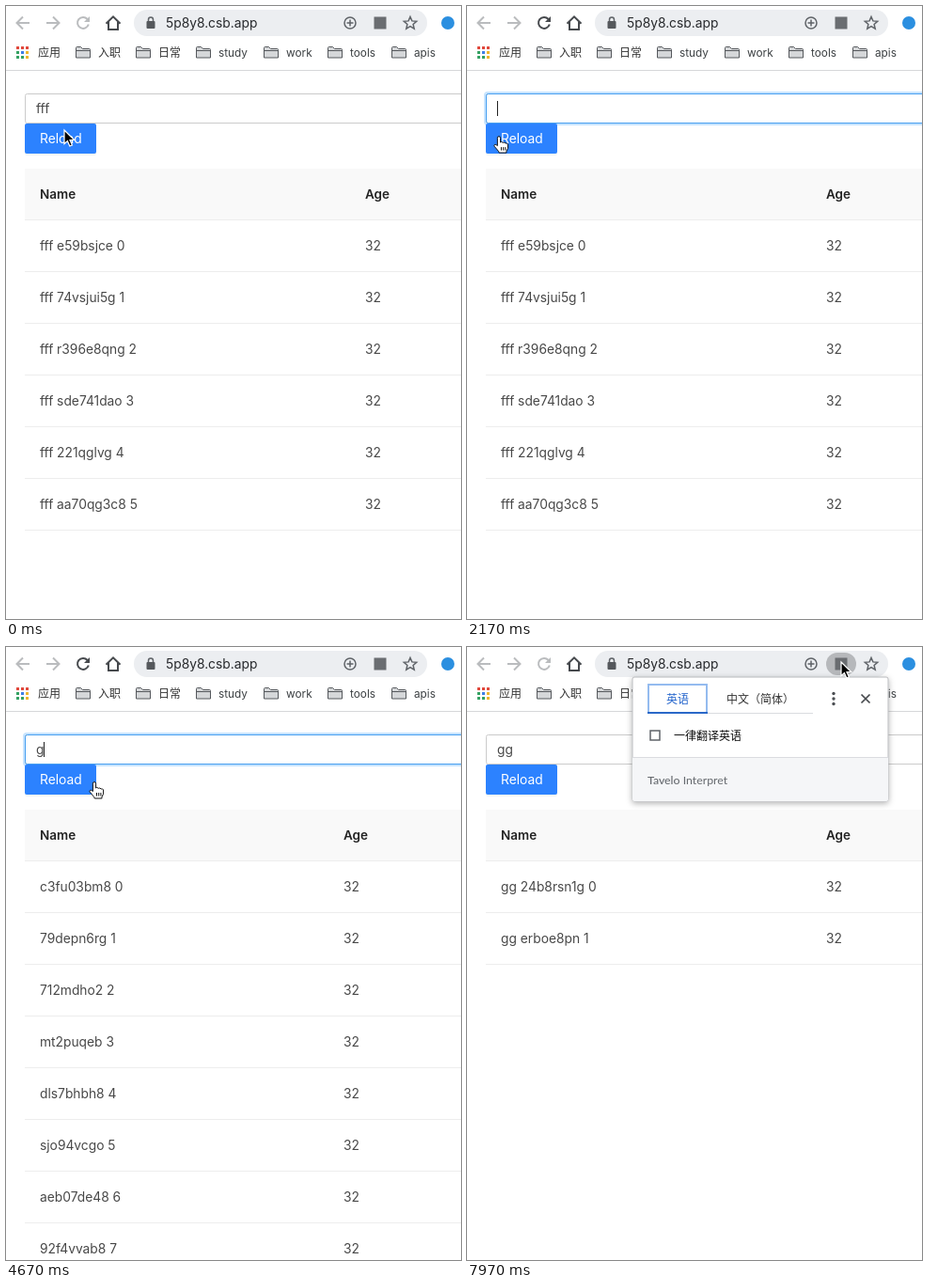
Recreate the animation shown at these times as an HTML page. Size 484 by 652 pixels, loop 8 s.

```html
<!DOCTYPE html>
<html lang="en">
<head>
<meta charset="utf-8">
<title>Table search demo</title>
<style>
  html, body { margin: 0; width: 100%; height: 100%; overflow: hidden; background: #fff; }
  svg { display: block; width: 484px; height: 652px; }
  text { font: 13.8px Inter, "Noto Sans CJK SC", "Noto Sans CJK", sans-serif; fill: #484848; white-space: pre; }
  .head { font-weight: 600; font-size: 13.5px; fill: #222; }
  .mark { font-size: 11.8px; fill: #3c4043; }
  .cjk { font: 12px "Noto Sans CJK SC", "Noto Sans CJK", sans-serif; fill: #333; }
  .line { fill: none; stroke: #46494d; stroke-width: 2; }
  .thin { fill: none; stroke: #5f6368; stroke-width: 1.5; }
</style>
</head>
<body>
<svg viewBox="0 0 484 652">
  <defs><filter id="shade" x="-10%" y="-10%" width="120%" height="130%">
    <feDropShadow dx="0" dy="2" stdDeviation="3" flood-opacity=".3"/>
  </filter></defs>

  <g id="toolbar">
    <path class="line" style="stroke:#babcbe" d="M25 18H12M18 11.5L11.5 18 18 24.5M43 18H56M50 11.5L56.5 18 50 24.5"/>
    <g id="refresh">
      <path d="M86.6 14A6 6 0 1 0 87.8 19.5" fill="none" stroke="currentColor" stroke-width="2"/>
      <path d="M89 11v6h-6z" fill="currentColor"/>
    </g>
    <path class="line" d="M106.5 18.8L114 11.3l7.5 7.5M109 17v8h10v-8"/>
    <rect x="136" y="4" width="312" height="28" rx="14" fill="#eceef1"/>
    <rect x="149.5" y="16" width="9" height="8" rx="1" fill="#55585c"/>
    <path class="thin" d="M151.5 16v-1.5a2.5 2.5 0 0 1 5 0V16"/>
    <text x="170" y="23" style="fill:#27292c">5p8y8.csb.app</text>
    <circle class="thin" cx="366" cy="18" r="6"/>
    <path class="thin" d="M362.5 18h7M366 14.5v7"/>
    <rect id="iconHover" x="382" y="6" width="32" height="24" rx="12"/>
    <rect x="391.5" y="11.5" width="13" height="13" fill="#6a6d71"/>
    <path class="thin" d="M430 11.5l1.9 4.4 4.8.4-3.6 3.2 1.1 4.7-4.2-2.5-4.2 2.5 1.1-4.7-3.6-3.2 4.8-.4z"/>
    <circle cx="470" cy="18" r="7" fill="#2b8fe0"/>
    <path d="M0 68.5H484" stroke="#d6d7d9"/>
  </g>
  <g id="bookmarks"></g>

  <rect x="20.5" y="93.5" width="480" height="31" rx="2" fill="#fff" stroke="#cbcbcb"/>
  <g id="focus" fill="none">
    <rect x="19" y="92" width="483" height="34" rx="3" stroke="#1890ff" stroke-opacity=".25" stroke-width="2"/>
    <rect x="20.5" y="93.5" width="480" height="31" rx="2" stroke="#469ff0"/>
  </g>
  <rect id="selection" y="100" height="17" fill="#4089ee"/>
  <text id="value" x="32" y="114"></text>
  <path id="spell" d="M32 116.5H47" stroke="#c44650" stroke-width="2" stroke-dasharray="2.5 1.5"/>
  <path id="caret" d="M0 101V117" stroke="#222"/>

  <rect id="wave" fill="#1890ff"/>
  <rect id="buttonShade" x="20" y="127" height="32" rx="2" fill-opacity=".045"/>
  <rect id="button" x="20" y="125" height="32" rx="2"/>
  <path id="spinner" d="M43 135.2A5.8 5.8 0 0 1 48.8 141" fill="none" stroke="#fff" stroke-width="1.2" stroke-linecap="round"/>
  <text id="label" y="146" style="fill:#fff">Reload</text>

  <g id="tables"></g>

  <g id="popup">
    <rect x="176" y="32" width="272" height="132" rx="2" fill="#fff" stroke="#b8babd" filter="url(#shade)"/>
    <path d="M176 117H448V162a2 2 0 0 1-2 2H178a2 2 0 0 1-2-2z" fill="#f5f6f8"/>
    <path d="M176 117.5H448M256 70.5H368" stroke="#dadce0"/>
    <rect x="193" y="40" width="62" height="30" fill="none" stroke="#94bbef" stroke-width="2"/>
    <path d="M192 70H256" stroke="#2a68c8" stroke-width="2"/>
    <text class="cjk" x="212" y="59.5" style="fill:#2465cc;font-weight:500">英语</text>
    <text class="cjk" x="276" y="59.5">中文（简体）</text>
    <g fill="#4b4e52"><circle cx="390" cy="49.5" r="1.7"/><circle cx="390" cy="55" r="1.7"/><circle cx="390" cy="60.5" r="1.7"/></g>
    <path class="line" style="stroke-width:1.7" d="M419.5 50.5l9 9m0-9l-9 9"/>
    <rect class="thin" x="195" y="89" width="10" height="10"/>
    <text class="cjk" x="220" y="98.5" style="fill:#111">一律翻译英语</text>
    <text x="192" y="145.5" style="font:12.3px Lato,sans-serif;fill:#666a6f"><tspan font-weight="500">Tavelo</tspan> Interpret</text>
  </g>

  <g id="cursor">
    <path id="arrow" d="M0 0V14.6L3.4 11.5 5.8 17 8.4 15.9 6 10.5H10.6Z" stroke="#fff" stroke-width="1.2"/>
    <path id="hand" d="M-1.6 9.5V1.2a1.6 1.6 0 0 1 3.2 0V6l1-.6 2 .9 1-.3 1.8 1 1-.2 1.2 1.2v4.2l-1.6 3.2v1.6h-7.8l-.6-1.6-4.4-5.2c-1-1.6.9-2.6 2.2-1.4zM2.5 11v3.5M4.7 11v3.5M6.9 11v3.5" fill="#fff" stroke="#111"/>
    <path id="beam" d="M-3-8q3 0 3 2V6q0 2-3 2M3-8q-3 0-3 2V6q0 2 3 2M-1.5 1H1.5" fill="none" stroke="#222"/>
  </g>
</svg>
<script>
const LOOP = 8000;
const $ = id => document.getElementById(id);
const set = (id, attrs) => { for (const k in attrs) $(id).setAttribute(k, attrs[k]); };
const show = (id, on) => { $(id).style.display = on ? '' : 'none'; };

// Static content
const folder = x => `<path d="M${x + .5} 55V44.5q0-1 1-1h4l2 2h7q1 0 1 1V55z" fill="#d5d7d9" stroke="#55585c"/>
  <path d="M${x + 1} 47.5h14" stroke="#55585c"/>`;
const RED = '#e0483c', GREEN = '#34a162', BLUE = '#3f7fe8', YELLOW = '#efb52e';
$('bookmarks').innerHTML =
  [RED, RED, RED, GREEN, BLUE, YELLOW, GREEN, GREEN, YELLOW].map((color, i) =>
    `<rect x="${11 + i % 3 * 5}" y="${43 + (i / 3 | 0) * 5}" width="3" height="3" fill="${color}"/>`).join('') +
  '<text class="cjk" x="34" y="54">应用</text>' +
  [[74, '入职'], [138, '日常'], [202, 'study'], [274, 'work'], [342, 'tools'], [410, 'apis']].map(([x, name]) =>
    `${folder(x)}<text class="${name > '~' ? 'cjk' : 'mark'}" x="${x + 24}" y="54">${name}</text>`).join('');

const table = (ageX, prefix, names) =>
  `<g><rect x="20" y="173" width="464" height="54" fill="#f9f9f9"/><path d="M20 227.5H484" stroke="#ededed"/>
  <text class="head" x="36" y="205">Name</text><text class="head" x="${ageX}" y="205">Age</text>` +
  names.split(' ').map((name, i) => {
    const y = 260 + i * 55;
    return `<text x="36" y="${y}">${prefix}${name} ${i}</text><text x="${ageX}" y="${y}">32</text>
      <path d="M20 ${y + 22.5}H484" stroke="#ededed"/>`;
  }).join('') + '</g>';
$('tables').innerHTML =
  table(382, 'fff ', 'e59bsjce 74vsjui5g r396e8qng sde741dao 221qglvg aa70qg3c8') +
  table(359, '', 'c3fu03bm8 79depn6rg 712mdho2 mt2puqeb dls7bhbh8 sjo94vcgo aeb07de48 92f4vvab8') +
  table(382, 'gg ', '24b8rsn1g erboe8pn');

// Timeline
const ACTIVE = 700, CLEAR = 1950, FOCUS = 4150, TYPE = [4540, 4800], POPUP = 7700;
const CLICKS = [2680, 5120], DELAY = 1000;
const POINTER = [[0, 62, 132], [150, 62, 132], [650, 66, 110], [1000, 60, 109], [1300, -14, 112],
  [1680, -14, 124], [2300, 40, 141], [2550, 55, 137], [3400, 55, 137], [3700, 62, 138], [4050, 90, 112],
  [4300, 92, 112], [4640, 94, 144], [4720, 94, 144], [5000, 81, 141], [6200, 81, 141], [6500, 120, 140],
  [6720, 120, 140], [7450, 398, 16]];
const BUTTON_HEAT = [[2250, 0], [2550, 1], [4150, 1], [4450, 0], [4670, 0], [4950, 1], [POPUP, 1], [7850, 0]];
const INPUT_GLOW = [[ACTIVE, 0], [900, 1], [2600, 1], [2850, 0], [FOCUS, 0], [4400, 1], [5040, 1], [5290, 0]];

const clamp = v => Math.max(0, Math.min(1, v));
const smooth = v => { v = clamp(v); return v * v * (3 - 2 * v); };
const expoOut = v => 1 - 2 ** (-10 * clamp(v));

function keyed(keys, t) {
  const i = keys.findIndex(k => k[0] > t);
  if (i === 0) return keys[0].slice(1);
  if (i < 0) return keys[keys.length - 1].slice(1);
  const a = keys[i - 1], b = keys[i], p = smooth((t - a[0]) / (b[0] - a[0]));
  return a.slice(1).map((v, n) => v + (b[n + 1] - v) * p);
}

function drawInput(t) {
  const [glow] = keyed(INPUT_GLOW, t);
  set('focus', { opacity: glow });
  const value = t < CLEAR ? 'fff' : 'g'.repeat(TYPE.filter(time => t >= time).length);
  const picked = t < CLEAR ? Math.floor(4 * clamp((t - 1020) / 160) * .99) : 0;
  const split = value.length - picked;
  $('value').innerHTML = value.slice(0, split) + `<tspan fill="#fff">${value.slice(split)}</tspan>`;
  const width = value ? $('value').getComputedTextLength() : 0;
  const pickedWidth = value ? width * picked / value.length : 0;
  set('selection', { x: 32 + width - pickedWidth, width: pickedWidth });
  show('spell', t >= ACTIVE && t < CLEAR);

  const focused = (t >= ACTIVE && t < 2600) || (t >= FOCUS && t < 5040);
  const lastEvent = [ACTIVE, CLEAR, FOCUS, ...TYPE].filter(time => time <= t).pop() || 0;
  show('caret', focused && !picked && (t - lastEvent) % 1060 < 530);
  set('caret', { transform: `translate(${Math.round(32 + width) + .5} 0)` });
}

function drawButton(t) {
  const click = CLICKS.filter(time => time <= t).pop() ?? -1e5;
  const elapsed = t - click, loading = elapsed < DELAY;
  const open = smooth(elapsed / 300) * (1 - smooth((elapsed - DELAY) / 300));
  const [heat] = keyed(BUTTON_HEAT, t);
  const width = 76 + 22 * open;
  const fill = loading ? '#6bbeff' : `rgb(${44 + 14 * heat},${130 + 27 * heat},255)`;
  set('button', { width, fill });
  set('buttonShade', { width });
  set('label', { x: 36 + 22 * open });
  set('spinner', { opacity: open, transform: `rotate(${elapsed * .36 % 360} 43 141)` });
  const spread = 6 * expoOut(elapsed / 400);
  set('wave', { x: 20 - spread, y: 125 - spread, width: width + 2 * spread, height: 32 + 2 * spread,
    rx: 2 + spread, opacity: .25 * (1 - expoOut(elapsed / 2000)) * (elapsed < 2000) });
  return loading;
}

function drawCursor(t, loading) {
  const [x, y] = keyed(POINTER, t);
  const overInput = x > 20 && y > 93 && y < 125;
  const overButton = x > 20 && x < 96 && y >= 125 && y < 157;
  let kind = 'arrow';
  if (t >= ACTIVE && (t < 1680 || overInput)) kind = 'beam';
  else if (t >= ACTIVE && overButton && !loading) kind = 'hand';
  for (const id of ['arrow', 'hand', 'beam']) show(id, id === kind);
  set('cursor', { transform: `translate(${x} ${y})` });
}

function draw(now) {
  const t = now % LOOP, popup = t >= POPUP;
  drawInput(t);
  drawCursor(t, drawButton(t));
  const loaded = CLICKS.filter(time => t >= time + DELAY).length;
  [...$('tables').children].forEach((g, i) => { g.style.display = i === loaded ? '' : 'none'; });
  $('refresh').style.color = t < ACTIVE || popup ? '#babcbe' : '#46494d';
  show('popup', popup);
  show('iconHover', t >= 7420);
  set('iconHover', { fill: popup ? '#b6b8bb' : '#dadce0' });
  requestAnimationFrame(draw);
}
draw(0);
</script>
</body>
</html>
```
